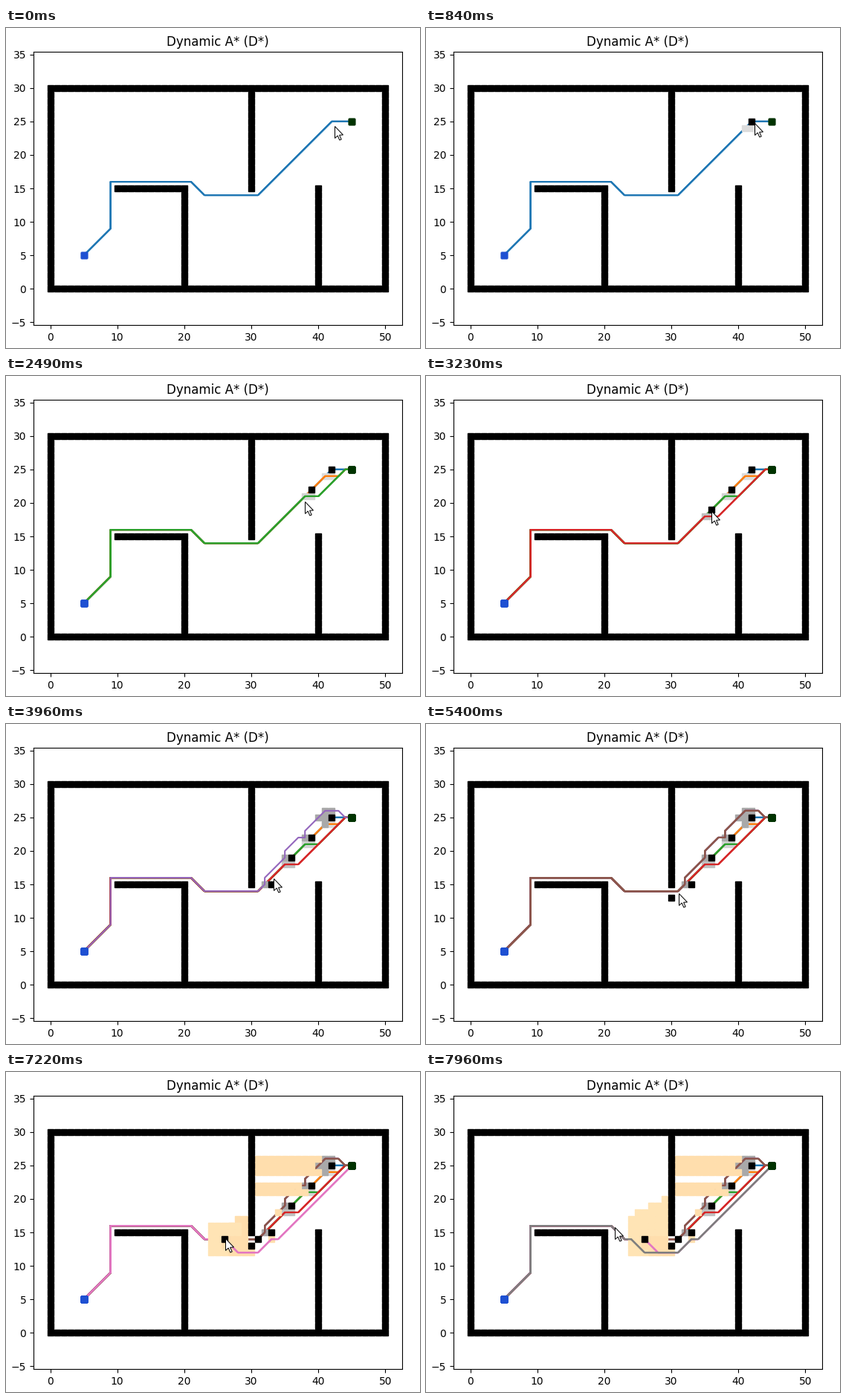
These frames come from a looping animation (557 by 431 pixels, 8 s). A matplotlib script:

```python
import numpy as np
import matplotlib.pyplot as plt
from matplotlib.animation import FuncAnimation
from matplotlib.patches import Polygon

W, H, DPI = 557, 431, 100
LOOP, STEP = 8000, 40
LEFT, RIGHT, TOP, BOTTOM = 37, 533, 32.25, 399.9
PASSES, GAP = 4, 90  # each path is stroked several times, which firms up its edges

plt.rcParams["font.family"] = "DejaVu Sans"
fig = plt.figure(figsize=(W / DPI + 1e-9, H / DPI + 1e-9), dpi=DPI, facecolor="white")
ax = fig.add_axes([LEFT / W, 1 - BOTTOM / H, (RIGHT - LEFT) / W, (BOTTOM - TOP) / H])
half = 27.5 * (BOTTOM - TOP) / (RIGHT - LEFT)
ax.set_xlim(-2.5, 52.5)
ax.set_ylim(15 - half, 15 + half)
ax.set_xticks(range(0, 51, 10))
ax.set_yticks(range(-5, 36, 5))
ax.set_title("Dynamic A* (D*)")


def squares(points, color, z):
    xs, ys = zip(*points)
    return ax.plot(xs, ys, "s", color=color, zorder=z)[0]


def block(x0, x1, y0, y1):
    return {(x, y) for x in range(x0, x1 + 1) for y in range(y0, y1 + 1)}


walls = (block(0, 50, 0, 30) - block(1, 49, 1, 29)
         | block(10, 20, 15, 15) | block(20, 20, 0, 15)
         | block(30, 30, 15, 30) | block(40, 40, 0, 15))
squares(sorted(walls), "black", 100)

START, GOAL = (5, 5), (45, 25)
TRUNK = [START, (9, 9), (9, 16), (21, 16), (23, 14)]
BEND = (31, 14)
AROUND = [BEND, (32, 15), (32, 16), (35, 19), (35, 20), (37, 22),
          (38, 22), (38, 23), (41, 26), (43, 26), (44, 25)]


def sidestep(x, y):
    """Pass one cell below an obstacle on the diagonal."""
    return [BEND, (x - 1, y - 1), (x + 1, y - 1), (44, 25)]


def under(x):
    """Leave the corridor at x and dip below the blocked gap."""
    return [(x, 14), (x + 2, 12), (31, 12), (33, 14), (34, 14)]


def blob(left, top):
    """Cells reopened left of the inner wall, bounded by left(y)."""
    return {(x, y) for y in range(12, top + 1) for x in range(left(y), 31 - (y > 13))}


beside = (block(40, 42, 24, 26) - {(40, 24), (40, 26), (42, 24), (42, 25)}
          | {(32, 15), (35, 19), (38, 22)})
wave = (blob(lambda y: 26 + max(0, y - 15, 13 - y), 17)
        | block(31, 40, 24, 26) | block(31, 38, 21, 22) | {(33, 14), (34, 18)}) - beside
spread = blob(lambda y: 24 + max(0, 2 * y - 35), 20)
spread = {c for c in spread if c[1] >= 15 or c not in wave}


class Replan:
    """One clicked obstacle, the cells it reopens and the new path."""
    count = 0

    def __init__(self, click, tail, spot=None, cells=(), color=None, delay=80):
        k = Replan.count
        Replan.count += 1
        z = 10 * (k + 1)
        self.click, self.delay = click, delay
        self.block = squares([spot], "black", 100) if spot else None
        self.cells = np.array(sorted(cells))
        if len(self.cells):
            dist = np.hypot(*(self.cells - spot).T)
            self.cells = self.cells[np.argsort(dist, kind="stable")]
            self.fill = squares(self.cells, color, z)
        xs, ys = zip(*TRUNK, *tail, GOAL)
        self.strokes = [(ax.plot(xs, ys, color=f"C{k}", lw=1.5, zorder=z + 5)[0],
                         squares([START], "#1e50d2", 110),
                         squares([GOAL], "#003300", 110)) for _ in range(PASSES)]

    def show(self, t):
        age = t - self.click
        if self.block:
            self.block.set_visible(age >= 0)
        if len(self.cells):
            part = np.floor(6 * np.clip(age / self.delay, 0, 1)) / 6
            n = round(len(self.cells) * part)
            self.fill.set_data(*self.cells[:n].T)
        for j, stroke in enumerate(self.strokes):
            for artist in stroke:
                artist.set_visible(age >= self.delay + j * GAP)


replans = [Replan(-1000, [BEND, (42, 25)])]
for i, (click, gray) in enumerate([(790, "gainsboro"), (1990, "lightgray"), (2950, "silver")]):
    x, y = 42 - 3 * i, 25 - 3 * i
    replans.append(Replan(click, sidestep(x, y), (x, y), block(x - 1, x, y - 1, y - 1), gray))
replans += [
    Replan(3870, AROUND, (33, 15), beside, "darkgray"),
    Replan(5040, AROUND, (30, 13)),
    Replan(5440, under(26), (31, 14), wave, "navajowhite", 480),
    Replan(7040, under(24), (26, 14), spread, "moccasin", 340),
]

# Mouse pointer on a pixel overlay
over = fig.add_axes([0, 0, 1, 1], zorder=5)
over.set_xlim(0, W)
over.set_ylim(H, 0)
over.axis("off")
ARROW = np.array([(0, 0), (0, 16), (3.7, 12.5), (6.3, 18.5), (8.7, 17.5), (6.1, 11.7), (11, 11.5)])
pointer = Polygon(ARROW, closed=True, fc="white", ec="black", lw=0.72)
over.add_patch(pointer)

# start, end and target of each pointer move
HOME = (442, 132)
MOVES = [
    (410, 560, (442, 128)), (1200, 1480, (418, 148)),
    (2200, 2490, (403, 169)), (2490, 2720, (388, 178)),
    (3150, 3690, (360, 208)), (4000, 4350, (340, 228)),
    (5420, 5520, (340, 224)), (6150, 6350, (321, 238)),
    (6350, 6940, (295, 224)), (7630, 7960, (254, 209)),
]


def pointer_at(t):
    pos = np.array(HOME, float)
    for begin, end, goal in MOVES:
        pos += (goal - pos) * np.clip((t - begin) / (end - begin), 0, 1)
    return np.round(pos) + 0.5


def draw(i):
    t = i * STEP + STEP / 2
    for r in replans:
        r.show(t)
    pointer.set_xy(ARROW + pointer_at(t))
    return []


anim = FuncAnimation(fig, draw, frames=LOOP // STEP, interval=STEP,
                     repeat=True, repeat_delay=0, blit=False)
plt.show()
```
